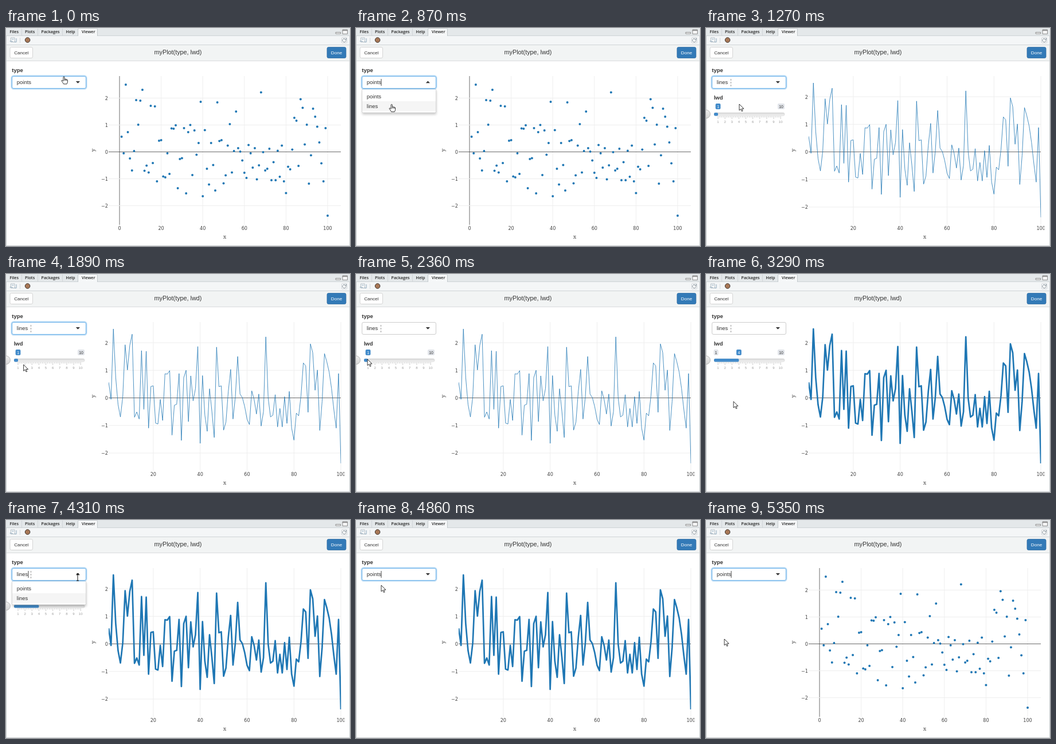
These frames come from a looping animation (600x381 px, 5430 ms). An HTML page:

```html
<!DOCTYPE html>
<html lang="en">
<head>
<meta charset="utf-8">
<title>myPlot gadget</title>
<style>
  html, body { margin: 0; width: 100%; height: 100%; overflow: hidden; background: #fff; }
  svg { display: block; width: 600px; height: 381px; font-family: "Liberation Sans", Arial, sans-serif; }
  text { fill: #333; white-space: pre; }
  .tabs text { font: 600 7.2px "Open Sans", sans-serif; fill: #222; }
  .ui { font-size: 9.45px; }
  .bold { font-weight: 700; }
  .btn { font-size: 8.1px; }
  .chart text { font: 8.1px "DejaVu Sans", Verdana, sans-serif; fill: #444; }
  .chart .axis { font: 9.5px "Noto Serif", serif; }
  .grid { stroke: #eee; }
  .zero { stroke: #444; stroke-width: .8; }
  .tiny { font-size: 6px; fill: #999; }
  .badge { font-size: 6.75px; }
  .cur { fill: #fff; stroke: #111; stroke-width: .85; stroke-linejoin: round; }
</style>
</head>
<body>
<svg viewBox="0 0 600 381">
  <defs>
    <linearGradient id="bar" x2="0" y2="1"><stop stop-color="#d6d6d6"/><stop offset="1" stop-color="#f3f3f3"/></linearGradient>
    <linearGradient id="knob" x2="0" y2="1"><stop stop-color="#eee"/><stop offset="1" stop-color="#d4d4d4"/></linearGradient>
    <filter id="soft" x="-20%" y="-20%" width="140%" height="150%"><feGaussianBlur stdDeviation="2"/></filter>
    <clipPath id="area"><rect x="179" y="84" width="405.3" height="260"/></clipPath>
    <clipPath id="pane"><rect x="145" y="78" width="445.5" height="295"/></clipPath>
  </defs>

  <rect width="600" height="381" fill="#fff"/>
  <g class="tabs">
    <rect width="600" height="14" fill="#e4e8ea"/>
    <path d="M0 13.5H600" stroke="#cdd3d6"/>
    <path d="M27.5 1V13M55.5 1V13M98.5 1V13" stroke="#d0d5d8"/>
    <path d="M125.5 14V2.5Q125.5 .5 127.5 .5H157.5Q159.5 .5 159.5 2.5V14" fill="#f5f7f8" stroke="#c3c9cc"/>
    <text x="6.5" y="9">Files</text><text x="33" y="9">Plots</text><text x="61.5" y="9">Packages</text>
    <text x="104.5" y="9">Help</text><text x="132" y="9">Viewer</text>
    <path d="M575 7.5H583.5V10H575Z" fill="#f4f4f4" stroke="#777" stroke-width=".8"/>
    <path d="M587 3H595.5V10.5H587Z" fill="#f4f4f4" stroke="#777" stroke-width=".8"/>
    <path d="M587 4H595.5" stroke="#777" stroke-width="1.4"/>
  </g>
  <rect y="14" width="600" height="15" fill="#f4f6f7"/>
  <path d="M8.5 17H15V24.5H8.5Z" fill="#fff" stroke="#9eabb5" stroke-width=".8"/>
  <path d="M6.5 23H12M10 19.5H13.5M15 24.5H18V18" fill="none" stroke="#8ea9bd"/>
  <path d="M24.5 17V26" stroke="#d5dadd"/>
  <circle cx="37.6" cy="21" r="4.3" fill="#a87857" stroke="#3c3029" stroke-width="1"/>
  <rect x="585.5" y="17" width="9" height="9" rx="1" fill="#fff" stroke="#b9c1c6" stroke-width=".7"/>
  <path d="M593 21.5A3 3 0 1 1 591.5 19M593.3 17.5V20.3H590.5" fill="none" stroke="#7d8b95"/>

  <rect y="29" width="600" height="29" fill="#f2f4f4"/>
  <path d="M0 29.5H600" stroke="#cfd4d7"/>
  <path d="M0 57.5H600" stroke="#d9dcdd"/>
  <path d="M.5 14V380.5H599.5V14" fill="none" stroke="#c8cccf"/>
  <g class="btn" text-anchor="middle">
    <rect x="7" y="33.5" width="39.5" height="19" rx="2.5" fill="#fff" stroke="#ccc" stroke-width=".8"/>
    <text x="26.8" y="46">Cancel</text>
    <rect x="560" y="33.5" width="33" height="19" rx="2.5" fill="#337ab7" stroke="#2e6da4" stroke-width=".8"/>
    <text x="576.5" y="46" style="fill:#fff">Done</text>
    <text x="300" y="46.3" font-size="10.8">myPlot(type, lwd)</text>
  </g>

  <g id="dots" class="chart" clip-path="url(#pane)"></g>
  <g id="lines" class="chart" clip-path="url(#pane)"></g>

  <g id="slider">
    <text class="ui bold" x="13.7" y="125.3">lwd</text>
    <g class="badge" text-anchor="middle">
      <g id="min"><rect x="13.5" y="132" width="8" height="10" rx="2" fill="#e1e4e9"/><text x="17.5" y="139.5">1</text></g>
      <rect x="125" y="132" width="12" height="10" rx="2" fill="#e1e4e9"/><text x="131" y="139.5">10</text>
      <g id="badge"><rect x="-4.4" y="132" width="8.8" height="10" rx="2" fill="#428bca"/><text id="num" y="139.5" style="fill:#fff"></text></g>
    </g>
    <rect x="14" y="148" width="123" height="5.4" rx="2.5" fill="url(#bar)" stroke="#ccc" stroke-width=".5"/>
    <rect id="fill" x="14" y="148" height="5.4" rx="2" fill="#428bca"/>
    <g id="scale" text-anchor="middle"></g>
    <circle id="knob" cy="150.5" r="7.4" fill="url(#knob)" stroke="#ababab" stroke-width=".8"/>
  </g>

  <text class="ui bold" x="10.3" y="77.3">type</text>
  <g id="menu">
    <rect x="11" y="109" width="129" height="42" fill="#000" opacity=".22" filter="url(#soft)"/>
    <rect x="10.5" y="106.5" width="129" height="41.5" rx="2" fill="#fff" stroke="#d0d0d0" stroke-width=".8"/>
    <rect id="hot" x="11" width="128" height="17" fill="#f5f5f5"/>
    <text class="ui" x="18.8" y="123.2">points</text>
    <text class="ui" x="18.8" y="140">lines</text>
  </g>
  <rect id="glow" x="9.5" y="83.5" width="131" height="23" rx="4" fill="none" stroke="#66afe9" stroke-width="2.4" opacity=".4"/>
  <rect id="box" x="10.5" y="84.5" width="129" height="21" rx="2.5" fill="#fff"/>
  <text id="value" class="ui" x="18.8" y="98.4"></text>
  <path id="caret" d="M0 89V101" stroke="#333" stroke-width=".9"/>
  <path id="ghost" d="M43.5 89V102" stroke="#888" stroke-width=".9" stroke-dasharray="3 2"/>
  <path id="tri" fill="#333"/>

  <g id="cursor">
    <path id="arrow" class="cur" d="M0 0V11L2.6 8.7 4.4 12.6 6.1 11.9 4.4 8.1H8Z"/>
    <path id="hand" class="cur" d="M-1.1 1.1Q0 -.3 1.1 1.1V5Q2.2 3.8 3 5.2Q4.2 4.3 4.9 5.7Q6.2 5.2 6.4 6.8V9.5Q6.2 11.5 5 13.4H-.6Q-1.6 11 -4 8.2Q-4.4 6.4 -2.6 7L-1.1 8.4ZM1.1 5V7.5M3 5.2V7.5M4.9 5.7V7.7"/>
    <path id="beam" d="M-2 -6H2M0 -6V6M-2 6H2" stroke="#111" fill="none"/>
  </g>
</svg>

<script>
const LOOP = 5430;
const $ = id => document.getElementById(id);
const show = (id, on) => { $(id).style.display = on ? '' : 'none'; };
const within = (t, a, b) => t >= a && t < b;

// Heights of the samples on the scatter plot, x = 1..100
const heights = [
  190, 219, 99, 182, 228, 249, 215, 126, 169, 127, 108, 249.5, 240.5, 252.5, 136, 236, 137, 268, 197, 196,
  259.5, 261, 219, 255, 175.5, 176, 170, 280, 229, 227.5, 175, 289, 182, 169.5, 257, 179, 221.5, 201, 129, 294,
  178.5, 246, 273.5, 201, 239.5, 284, 130, 197.5, 196, 271.5, 257.5, 205.5, 168, 252.5, 215, 146, 210, 216, 231.5, 253,
  262, 204.5, 219, 244, 210, 264.5, 240, 112.5, 217, 249, 246, 211, 266, 234.5, 266, 214.5, 260, 205.5, 268, 288.5,
  242.5, 247, 212.5, 157, 162, 241, 124.5, 139.5, 203.5, 169, 272, 222.5, 141, 155, 172.5, 200, 236.5, 268, 175, 328
];
const ZERO = 216.5;
const ys = heights.map(h => (ZERO - h) / 47);

function axes(x0, dx, dy, first) {
  let s = '';
  for (let v = first; v <= 100; v += 20) {
    const x = x0 + v * dx;
    s += `<path class="${v ? 'grid' : 'zero'}" d="M${x} 84V344"/>` +
      `<text x="${x}" y="353" text-anchor="middle">${v}</text>`;
  }
  for (let v = -2; v <= 2; v++) {
    const y = ZERO - v * dy;
    s += `<path class="${v ? 'grid' : 'zero'}" d="M179 ${y}H584"/>` +
      `<text x="178" y="${y + 3.5}" text-anchor="end">${v < 0 ? '\u2212' : ''}${Math.abs(v)}</text>`;
  }
  return s + '<text class="axis" x="381.5" y="367.5" text-anchor="middle">x</text>' +
    '<text class="axis" transform="translate(154.5 213.5) rotate(-90)" text-anchor="middle">y</text>';
}

const dotX = x => 198 + x * 3.63, lineX = x => 179.1 + (x - 1) * 4.091;
$('dots').innerHTML = axes(198, 3.63, 47, 0) +
  ys.map((y, i) => `<circle cx="${dotX(i + 1)}" cy="${ZERO - y * 47}" r="2" fill="#1f77b4"/>`).join('');
$('lines').innerHTML = axes(lineX(0), 4.091, 48.2, 20) +
  `<polyline id="trace" clip-path="url(#area)" fill="none" stroke="#1f77b4" stroke-linejoin="round" points="${
    ys.map((y, i) => lineX(i + 1) + ',' + (ZERO - y * 48.2)).join(' ')}"/>`;

const knobX = v => 21 + (v - 1) * 12.13;
let marks = '';
for (let i = 0; i <= 36; i++) {
  const x = knobX(1 + i / 4), big = i % 4 === 0;
  marks += `<path d="M${x} 154V${big ? 159 : 156.5}" stroke="#aaa" stroke-width=".6"/>`;
  if (big) marks += `<text class="tiny" x="${x}" y="165.5">${1 + i / 4}</text>`;
}
$('scale').innerHTML = marks;

// Pointer moves: start, end, steps, target, optional bend
const moves = [
  [80, 400, 5, 125, 92],
  [720, 950, 4, 58, 133, 58, 140],
  [1510, 1980, 7, 22, 158, 36, 164],
  [2060, 2360, 5, 20, 149],
  [2460, 2600, 3, 31, 157],
  [2660, 3130, 7, 57, 160],
  [3210, 3450, 4, 49, 235, 43, 248],
  [3620, 4080, 7, 125, 100, 80, 172],
  [4480, 4710, 4, 44, 114],
  [5120, 5350, 4, 32, 208]
];

function pointer(t) {
  let x = 101, y = 84.5;
  for (const [a, b, n, tx, ty, cx = (x + tx) / 2, cy = (y + ty) / 2] of moves) {
    if (t < a) break;
    let k = 0;
    while (k < n && t >= Math.floor((a + (b - a) * k / (n - 1)) / 10) * 10) k++;
    const u = k / n, w = 1 - u;
    x = w * w * x + 2 * w * u * cx + u * u * tx;
    y = w * w * y + 2 * w * u * cy + u * u * ty;
  }
  return [x, y];
}

function draw(t) {
  const [x, y] = pointer(t);
  const open = within(t, 550, 1100) || within(t, 4310, 4860);
  const focus = !within(t, 2290, 4310);
  const picked = within(t, 1100, 4860) ? 'lines' : 'points';
  const lined = within(t, 1190, 4960);

  show('dots', !lined);
  show('lines', lined);
  $('trace').setAttribute('stroke-width', t < 3290 ? .8 : 2.7);

  const lwd = t < 2460 ? 1 : t < 3200 ? 1 + Math.round((x + 1 - 21) / 12.13) : 4;
  const kx = knobX(lwd);
  show('slider', within(t, 1190, 4860));
  show('min', lwd > 1);
  $('num').textContent = lwd;
  $('badge').setAttribute('transform', `translate(${kx})`);
  $('fill').setAttribute('width', kx - 14);
  $('knob').setAttribute('cx', kx);

  show('menu', open);
  const onLines = y > 128 || (y < 111 && picked === 'lines');
  $('hot').setAttribute('y', onLines ? 128 : 111);
  show('glow', focus);
  $('box').setAttribute('stroke', focus ? '#66afe9' : '#ccc');
  $('value').textContent = picked;
  show('caret', open || t >= 4860);
  $('caret').setAttribute('transform', `translate(${picked === 'lines' ? 39 : 44})`);
  show('ghost', picked === 'lines');
  $('tri').setAttribute('d', open ? 'M121.8 96.3H129L125.4 92.5Z' : 'M121.8 93H129L125.4 96.8Z');

  const onBox = within(x, 10, 140) && within(y, 84, 107);
  const kind = onBox ? (open ? 'beam' : 'hand') : open && y > 107 ? 'hand' : 'arrow';
  for (const id of ['arrow', 'hand', 'beam']) show(id, id === kind);
  $('cursor').setAttribute('transform', `translate(${x} ${y})`);
}

let start;
function tick(now) {
  start ??= now;
  draw((now - start) % LOOP);
  requestAnimationFrame(tick);
}
draw(0);
requestAnimationFrame(tick);
</script>
</body>
</html>
```
